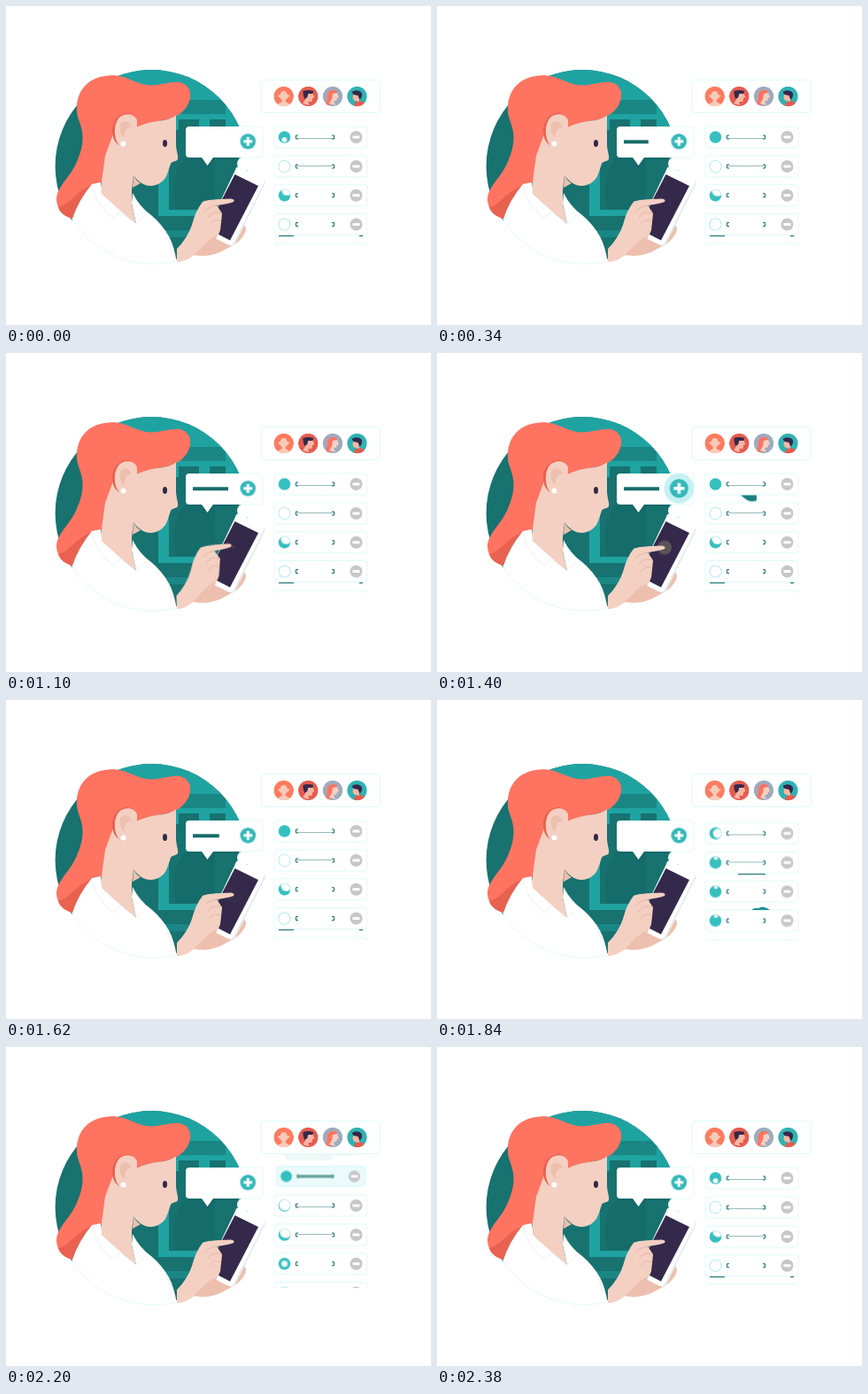
Animation of 480x360 px, one loop 2400 ms. Source, as an HTML page:

```html
<!DOCTYPE html>
<html lang="en">
<head>
<meta charset="utf-8">
<title>Group chat</title>
<style>
html, body { margin: 0; width: 100%; height: 100%; overflow: hidden; background: #fff; }
svg { display: block; width: 100vw; height: 100vh; }
.anim { animation: 2400ms linear infinite; }

.hair { fill: #ff7361; }
.hair-dark { fill: #e9614f; }
.skin { fill: #f4d0c2; }
.skin-dark { fill: #edbfae; }
.light { fill: #1fa3a1; }
.mid { fill: #1a8785; }
.white { fill: #fff; }
.teal { fill: #36bfbf; }
.fold { fill: none; stroke: #eef2f2; stroke-width: 1; }
.card { fill: #fff; stroke: #dcf9f9; stroke-width: .9; }
.ink { fill: none; stroke: #176b69; }

.type { stroke-dasharray: 40; animation-name: type; }
@keyframes type {
  0%, 1% { stroke-dashoffset: 40; opacity: 0; }
  1.1% { stroke-dashoffset: 40; opacity: 1; }
  20%, 65% { stroke-dashoffset: 0; opacity: 1; }
  75% { stroke-dashoffset: 40; opacity: 1; }
  75.5%, 100% { stroke-dashoffset: 40; opacity: 0; }
}

.hand { transform-origin: 195px 288px; animation-name: hand; }
@keyframes hand {
  0%, 33% { transform: none; }
  43%, 47% { transform: rotate(-2.3deg); }
  54%, 100% { transform: none; }
}

.tap { animation-name: tap; }
@keyframes tap {
  0%, 44.5% { transform: scale(0); opacity: 1; }
  45.83% { transform: scale(.13); opacity: 1; }
  58.33% { transform: scale(1); opacity: 1; }
  68%, 100% { transform: scale(1.3); opacity: 0; }
}

.ring { animation-name: ring; }
@keyframes ring {
  0%, 46% { transform: scale(.45); opacity: 1; }
  58.33% { transform: scale(1); opacity: 1; }
  68%, 100% { transform: scale(1.05); opacity: 0; }
}

.plus { animation-name: plus; }
@keyframes plus {
  0%, 46% { transform: none; }
  58.33% { transform: scale(1.2); }
  68%, 100% { transform: none; }
}

.list { animation-name: slide; }
@keyframes slide {
  0%, 75% { transform: none; }
  76.67% { transform: translateY(2.4px); }
  86.67% { transform: translateY(23px); animation-timing-function: ease-out; }
  95%, 100% { transform: translateY(33px); }
}

.fresh { animation-name: drop; }
@keyframes drop {
  0%, 79% { transform: translate(355px, 106px) scale(.4); opacity: 0; }
  79.1% { transform: translate(355px, 106px) scale(.4); opacity: 1; }
  86.67% { transform: translate(355px, 138px) scale(.76); opacity: 1; animation-timing-function: ease-out; }
  95%, 100% { transform: translate(355px, 148px); opacity: 1; }
}
.tint { animation-name: tint; }
@keyframes tint {
  0%, 86.67% { fill: #cdf5f6; stroke: #b4edee; }
  95%, 100% { fill: #fff; stroke: #dcf9f9; }
}
.solid { animation-name: solid; }
@keyframes solid { 0%, 89% { opacity: 1; } 96%, 100% { opacity: 0; } }
.hollow { animation-name: hollow; }
@keyframes hollow { 0%, 89% { opacity: 0; } 96%, 100% { opacity: 1; } }
.trail { animation-name: trail; }
@keyframes trail { 0%, 82% { opacity: 0; } 85%, 88% { opacity: 1; } 92%, 100% { opacity: 0; } }

/* white shape that moves across each small portrait */
.bite0 { animation-name: bite0; }
@keyframes bite0 {
  0% { transform: translate(0, 3px) scale(.4); }
  15%, 73% { transform: scale(0); }
  76.67% { transform: translate(2.5px, 0) scale(.75); }
  86.67% { transform: translate(1px, -2px) scale(.85); }
  96%, 100% { transform: none; }
}
.bite1 { animation-name: bite1; }
@keyframes bite1 {
  0%, 73% { transform: none; }
  76.67% { transform: translate(.5px, -5px) scale(.3); }
  86.67% { transform: none; }
  97%, 100% { transform: translate(3px, -6px) scale(.9); }
}
.bite2 { animation-name: bite2; }
@keyframes bite2 {
  0% { transform: translate(3px, -6px) scale(.9); }
  30%, 73% { transform: translate(2px, -4px) scale(.85); }
  76.67% { transform: translate(.5px, -5px) scale(.3); }
  86.67% { transform: scale(0); }
  97%, 100% { transform: none; }
}
.bite3 { animation-name: bite3; }
@keyframes bite3 {
  0%, 73% { transform: none; }
  76.67% { transform: translate(.5px, -5px) scale(.3); }
  86.67%, 100% { transform: none; }
}
.bite-new { animation-name: biteNew; }
@keyframes biteNew {
  0%, 90% { transform: scale(0); }
  99%, 100% { transform: translate(0, 3px) scale(.4); }
}

.glint1 { animation-name: glint1; }
@keyframes glint1 {
  0%, 28% { transform: scale(0); }
  31.67% { transform: scale(.4); }
  38%, 48% { transform: scale(0); }
  58.33% { transform: scale(1); }
  66%, 100% { transform: scale(0); }
}
.glint2 { animation-name: glint2; }
@keyframes glint2 { 0%, 75% { opacity: 0; } 76%, 78% { opacity: 1; } 80%, 100% { opacity: 0; } }
.rule { animation-name: rule; }
@keyframes rule { 0%, 74% { opacity: 1; } 75%, 96% { opacity: 0; } 98%, 100% { opacity: 1; } }
</style>
</head>
<body>
<svg viewBox="0 0 480 360">
  <defs>
    <clipPath id="disc"><circle cx="164.300" cy="180.800" r="108.700"/></clipPath>
    <clipPath id="face"><circle r="7"/></clipPath>
    <clipPath id="badge"><circle r="11.300"/></clipPath>
    <clipPath id="listArea"><path d="M295 122H420V271.500H295Z"/></clipPath>
    <rect id="rowCard" x="-52" y="-12" width="105" height="24" rx="3.500"/>
    <g id="minus">
      <circle cx="40.500" r="7" fill="#c8c7c7"/>
      <path class="white" d="M36.500-1.500h8v3h-8z"/>
    </g>
    <path id="ends" class="ink" d="M-25-2h-2.500v4h2.500M13-2h2.500v4H13"/>
    <path id="bar" class="ink" d="M-26 1.500H14" stroke-width=".7" opacity=".65"/>
    <circle id="rim" r="7" fill="none" stroke="#a5e8e9" stroke-width=".8"/>
  </defs>

  <!-- room -->
  <g clip-path="url(#disc)">
    <path fill="#177270" d="M50 65H280V295H50Z"/>
    <path class="light" d="M50 65H280V106H50ZM248 106H280V140H248Z"/>
    <path class="mid" d="M186 106H248V122H186Z"/>
    <path class="light" d="M185 122H250V128H185ZM185 122H195V140H185ZM218 122H230V140H218ZM172 168H184V232H172ZM172 230H230V237H172Z"/>
    <path class="mid" d="M160 253H230V261H160Z"/>
    <path fill="#156866" d="M202 172Q184 192 192 229H236V172Z" opacity=".5"/>
  </g>
  <ellipse class="white" cx="270" cy="178" rx="9" ry="8"/>

  <!-- woman -->
  <path class="hair" d="M80 113C81 96 92 80 116 78.500C137 77 146 89 163 89.500C178 89 187 85 196 86C206 88 209 96 208 103C206 117 194 126 178 129Q160 131 147 138L125 165L108 199L97 202C88 211 80 226 75 240C66 238 58 231 57 219C57 203 74 193 81 173C88 157 88 144 83 131Q79 121 80 113Z"/>
  <path class="hair-dark" d="M75 240C66 237 61 233 59 227C73 224 78 209 97 202C87 212 80 226 75 240Z"/>
  <path class="skin" d="M147 137Q162 130 178 129Q187 127 192 123.500V156C192 163 195 169 194 173C192 176 187 175 186 178C184 183 183 189 180 194C175 201 168 204 159 202.500C151 200 147 195 144 191L142 208V224L147 246L106 213L112 169L122 142Z"/>
  <path class="skin-dark" d="M144 191C146 195 148 198 152 200L143 205Z"/>
  <path class="hair-dark" d="M139 121C126 121 119 131 120 143C121 151 124 155 128 157L144 139L148 130Z"/>
  <path class="skin" d="M148 129C145 121 133 120 127 127C121 135 122 150 127 156C132 162 139 156 140 149L148 146Z"/>
  <path class="skin-dark" d="M129 133Q138 126 142 137Q133 136 134 149Q127 144 129 133Z"/>
  <circle class="white" cx="132.500" cy="155.500" r="3"/>
  <ellipse cx="179.500" cy="155" rx="2.500" ry="4" fill="#33284a"/>
  <path class="white" d="M97 201L107 199L108 212Q124 227 147 246L142 223L143 211Q151 227 164 236Q176 246 184 260Q190 271 193 290Q160 296 128 290L72 258L75 240Q82 219 97 201Z"/>
  <path d="M74 240A109 109 0 0 0 192 288" fill="none" stroke="#dcf6f6" stroke-width=".7"/>
  <path class="fold" d="M97 202Q99 221 121 240L129 232L147 246L157 236M180 254Q185 265 187 280"/>

  <!-- phone and hands -->
  <path class="skin-dark" d="M209 276Q225 268 244 257L267 246Q273 249 270 256Q265 267 249 274Q229 286 209 280Z"/>
  <path fill="#e3edee" d="M263 183L291 196Q294 198 292 202L259 268Q257 272 252 270Z"/>
  <path class="white" d="M264 182L289 194Q293 196 291 200L257 267Q255 271 250 269L228 258Q224 256 227 252L259 185Q260 180 264 182Z"/>
  <path fill="#35294b" d="M258.500 190L285 203L253 264.500L227 251Z"/>
  <g transform="translate(257 219.500)"><circle class="anim tap" r="8" fill="#5d555b"/></g>
  <g class="anim hand">
    <path class="skin" d="M193 289L193 274Q205 262 210 247Q214 231 222 221Q227 218 254 217.500Q259 218 257 221Q253 223 238 225L244 234Q243 245 242 253Q240 261 230 267Q220 273 211 282Q202 289 193 289Z"/>
    <path d="M238 225Q229 226 224 232M243 234Q233 230 228 239M243 243Q235 239 230 247" fill="none" stroke="#e6b6a5" stroke-width="1"/>
    <path class="skin-dark" d="M239 259Q230 262 220 273L211 282Q224 278 235 267Z"/>
  </g>

  <!-- speech bubble -->
  <path d="M208 139H262V173H236L228 183L220 173H205Z" fill="#125f5e" opacity=".35"/>
  <path class="white" d="M207 136H286Q290 136 290 140V167Q290 171 286 171H234L227.500 180L221 171H207Q203 171 203 167V140Q203 136 207 136Z"/>
  <path d="M263 136H286Q290 136 290 140V167Q290 171 286 171H263" fill="none" stroke="#dcf8f8" stroke-width=".8"/>
  <path class="ink anim type" d="M211 153.300H251" stroke-width="4"/>
  <g transform="translate(273.300 152.800)">
    <circle class="anim ring" r="17" fill="#c6f1f2"/>
    <g class="anim plus">
      <circle r="8.800" fill="#35b8b9"/>
      <path class="white" d="M-1.500-5h3v3.500H5v3H1.500V5h-3V1.500H-5v-3h3.500Z"/>
    </g>
  </g>

  <!-- contact list -->
  <g clip-path="url(#listArea)">
    <g class="anim list">
      <g transform="translate(355 148)">
        <use href="#rowCard" class="card"/><use href="#minus"/><use href="#ends"/><use href="#bar"/>
        <g transform="translate(-40.500 0)" clip-path="url(#face)"><circle class="teal" r="7"/><circle class="white anim bite0" r="7"/><use href="#rim"/></g>
      </g>
      <g transform="translate(355 181)">
        <use href="#rowCard" class="card"/><use href="#minus"/><use href="#ends"/><use href="#bar" y="-2"/>
        <g transform="translate(-40.500 0)" clip-path="url(#face)"><circle class="teal" r="7"/><circle class="white anim bite1" r="7"/><use href="#rim"/></g>
      </g>
      <g transform="translate(355 213.700)">
        <use href="#rowCard" class="card"/><use href="#minus"/><use href="#ends"/>
        <g transform="translate(-40.500 0)" clip-path="url(#face)"><circle class="teal" r="7"/><circle class="white anim bite2" r="7"/><use href="#rim"/></g>
      </g>
      <g transform="translate(355 246.500)">
        <use href="#rowCard" class="card"/><use href="#minus"/><use href="#ends"/>
        <g transform="translate(-40.500 0)" clip-path="url(#face)"><circle class="teal" r="7"/><circle class="white anim bite3" r="7"/><use href="#rim"/></g>
      </g>
      <use href="#rowCard" class="card" x="355" y="280"/>
    </g>
  </g>
  <path class="ink anim rule" d="M308 259.500H325M399 259.500H403"/>
  <g transform="translate(352 160.500)"><path class="anim glint1" fill="#198180" d="M-9 0H9V6Q1 9-4 4Z"/></g>
  <g class="anim glint2">
    <path class="ink" d="M340 196.500H371"/>
    <path fill="#1f9492" d="M355 237Q359 234 363 235Q368 231 376 237Z"/>
  </g>

  <path class="anim trail" fill="#2a9d9c" d="M313 121H400L394 122.500H372L366 128H318Z"/>
  <g class="anim fresh">
    <use href="#rowCard" class="card anim tint"/>
    <use href="#minus"/>
    <path class="ink anim solid" d="M-28 0H16" stroke-width="3.500"/>
    <g class="anim hollow"><use href="#ends"/><use href="#bar"/></g>
    <g transform="translate(-40.500 0)" clip-path="url(#face)"><circle class="teal" r="7"/><circle class="white anim bite-new" r="7"/><use href="#rim"/></g>
  </g>

  <!-- group card -->
  <rect class="card" x="288" y="83.500" width="134.500" height="37" rx="4"/>
  <g transform="translate(313.700 102)" clip-path="url(#badge)">
    <circle r="11.300" fill="#ff7b5f"/>
    <path fill="#f7cbb9" d="M0-6Q3-6 4-2L7-1L4 2L2 4V6L7 9V12H-7V9L-2 6V4L-4 2L-7-1L-4-2Q-3-6 0-6Z"/>
  </g>
  <g transform="translate(341.300 102)" clip-path="url(#badge)">
    <circle r="11.300" fill="#e65b50"/>
    <path fill="#f6b7a3" d="M-3-4H5L7 1L5 2L4 6H0L1 10L-6 8L-3 3Z"/>
    <path fill="#35294b" d="M-6-6Q0-8 6-6L5-3L0-3L-1 1L-4 3Q-6-1-6-6Z"/>
  </g>
  <g transform="translate(369 102)" clip-path="url(#badge)">
    <circle r="11.300" fill="#9faabd"/>
    <path fill="#ff7361" d="M-8 10Q-6 4-6-1Q-5-8 1-7Q5-7 5-4L0 2L-3 10Z"/>
    <path fill="#f4d0c2" d="M0-3L5-4L7 1L5 2L4 5H1L3 10L-4 8L-1 3Z"/>
  </g>
  <g transform="translate(396.500 102)" clip-path="url(#badge)">
    <circle r="11.300" fill="#2fb3b2"/>
    <path fill="#e65b50" d="M-4 12Q-3 5 2 5Q8 5 9 10V12Z"/>
    <path fill="#f6b7a3" d="M-4-3H3V3L2 6L-2 5L-4 4L-5 1Z"/>
    <path fill="#35294b" d="M-6-5Q-2-8 3-6Q7-4 5 1L3 4L1-1L-4-2Z"/>
  </g>
</svg>
</body>
</html>
```
